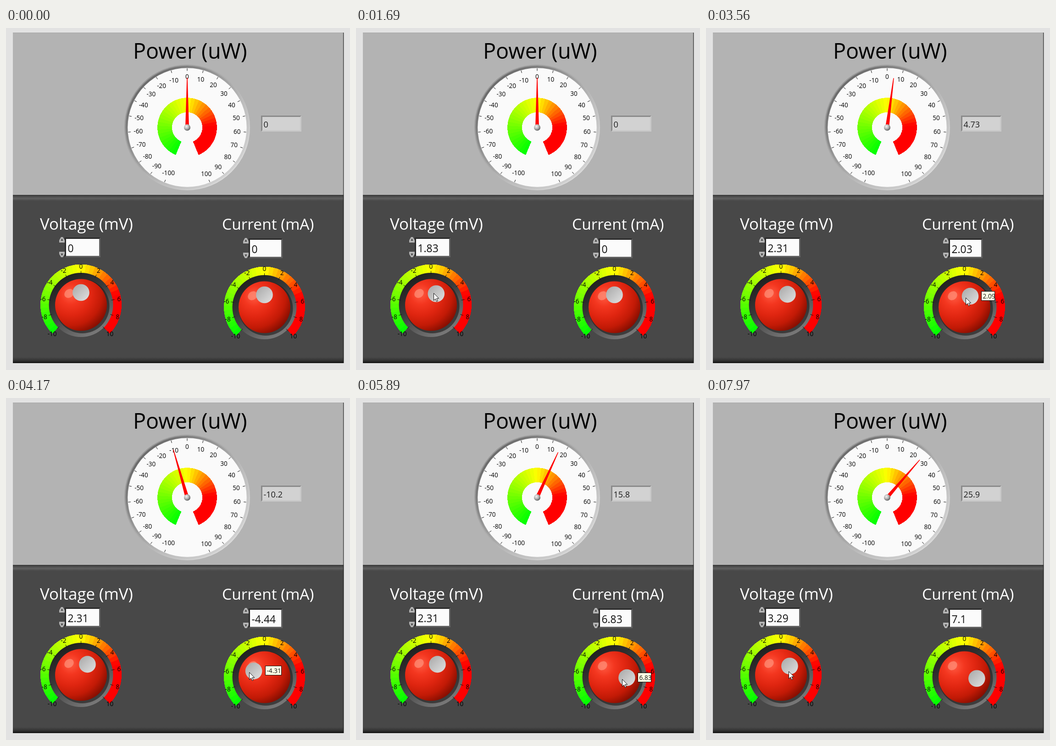
An HTML page that plays this animation: 750 px wide and 746 px high, repeating every 8000 ms.

```html
<!DOCTYPE html>
<html lang="en">
<head>
<meta charset="utf-8">
<title>Power meter</title>
<style>
  html, body { margin: 0; width: 100%; height: 100%; overflow: hidden; background: #e2e2e2; }
  svg { display: block; width: 750px; height: 746px; font-family: "Open Sans", "Noto Sans", sans-serif; }
  .scale { font-size: 13.6px; text-anchor: middle; }
  .tick { stroke: #111; stroke-width: 1; }
  .title { fill: #fff; }
  .value { font-size: 22.8px; fill: #111; }
</style>
</head>
<body>
<svg id="stage" viewBox="0 0 750 746"></svg>
<script>
const LOOP = 8000;
const REFRESH = 80;
const stage = document.getElementById('stage');
const gauge = { x: 395, y: 217, perUnit: 1.575 };
const knobs = {
  voltage: { x: 163.5, y: 604, perUnit: 13.5 },
  current: { x: 563.5, y: 609, perUnit: 13.5 }
};

const polar = (c, r, degrees) => {
  const a = degrees * Math.PI / 180;
  return [c.x + r * Math.sin(a), c.y - r * Math.cos(a)];
};
const at = p => p.map(n => n.toFixed(2)).join(' ');
const rect = (x, y, w, h, fill) => `<rect x="${x}" y="${y}" width="${w}" height="${h}" fill="${fill}"/>`;
const circle = (c, r, fill) => `<circle cx="${c.x}" cy="${c.y}" r="${r}" fill="${fill}"/>`;
const text = (x, y, str, attrs) => `<text x="${x}" y="${y}" ${attrs}>${str}</text>`;
const stops = list => list.map(([o, c]) => `<stop offset="${o}" stop-color="${c}"/>`).join('');
const linear = (id, direction, ...list) =>
  `<linearGradient id="${id}" x1="0" y1="0" ${direction}>${stops(list)}</linearGradient>`;
const radial = (id, shape, ...list) =>
  `<radialGradient id="${id}" ${shape}>${stops(list)}</radialGradient>`;

// Green to yellow below zero, then yellow to red well before full scale.
function band(c, inner, outer, limit) {
  const steps = 40;
  let out = '';
  for (let i = 0; i < steps; i++) {
    const v = (i + .5) / steps * 2 - 1;
    const red = Math.round(255 * Math.min(1, 1 + v));
    const green = Math.round(255 * (v < 0 ? 1 : Math.max(0, 1 - v / .54)));
    const a = limit * (i / steps * 2 - 1), b = limit * ((i + 1) / steps * 2 - 1);
    out += `<path shape-rendering="crispEdges" fill="rgb(${red},${green},0)" d="M${at(polar(c, inner, a))}` +
      `L${at(polar(c, outer, a))}A${outer} ${outer} 0 0 1 ${at(polar(c, outer, b))}` +
      `L${at(polar(c, inner, b))}A${inner} ${inner} 0 0 0 ${at(polar(c, inner, a))}"/>`;
  }
  return out;
}

function scale(c, max, step, tickFrom, tickTo, radius) {
  let out = '';
  for (let v = -max; v <= max; v += step) {
    const angle = v * c.perUnit;
    const [x, y] = polar(c, radius(v), angle);
    out += `<path class="tick" d="M${at(polar(c, tickFrom, angle))}L${at(polar(c, tickTo, angle))}"/>` +
      text(x.toFixed(1), (y + 5).toFixed(1), v, 'class="scale"');
  }
  return out;
}

function field(x, y, w, h, id) {
  return rect(x, y, w, h, '#2b2b2b') +
    `<path d="M${x} ${y + h}h${w}v${-h}l-3 3v${h - 6}h${6 - w}z" fill="#626262"/>` +
    rect(x + 3, y + 3, w - 6, h - 6, '#fbfbfb') +
    text(x + 6.5, y + 32, '0', `id="${id}" class="value"`);
}

function spinner(x, y) {
  const arrow = (dy, flip) => `<g transform="translate(${x} ${y + dy}) scale(1 ${flip})">
    <path d="M-6 6V1L-2 -6H2L6 1V6z" fill="#b4b4b4"/><path d="M-2.5 2L0 -3L2.5 2z" fill="#444"/></g>`;
  return arrow(0, 1) + arrow(32, -1);
}

function knob(name) {
  const c = knobs[name];
  return band(c, 69, 88.5, 135) + circle(c, 70, 'url(#groove)') +
    `<g opacity=".6">${circle({ x: c.x + 3, y: c.y + 3 }, 59, '#1c1c1c')}</g>` +
    circle(c, 56.5, 'url(#red)') +
    `<ellipse rx="11" ry="9" transform="translate(${c.x - 26} ${c.y - 25}) rotate(-40)" fill="#ff9680" opacity=".65"/>` +
    scale(c, 10, 2, 67, 74, v => Math.abs(v) === 10 ? 89 : 84) +
    `<circle id="${name}Dot" r="18.3" fill="url(#silver)"/>`;
}

stage.innerHTML = `<defs>
  ${linear('top', 'x2="0" y2="1"', [0, '#353535'], [.25, '#4a4a4a'], [.6, '#606060'], [1, '#484848'])}
  ${linear('bottom', 'x2="0" y2="1"', [0, '#484848'], [.5, '#353535'], [1, '#111'])}
  ${linear('bezel', 'x2="1" y2="1"', [.1, '#626262'], [.45, '#a0a0a0'], [.62, '#bcbcbc'], [.9, '#d4d4d4'])}
  ${linear('rim', 'x2="1" y2="1"', [.1, '#929292'], [.5, '#b1b1b1'], [.9, '#e0e0e0'])}
  ${linear('groove', 'x2=".6" y2="1"', [.1, '#1c1c1c'], [.5, '#393939'], [.75, '#5a5a5a'], [1, '#777'])}
  ${linear('silver', 'x2="1" y2="1"', [.1, '#adadad'], [.9, '#dcdcdc'])}
  ${radial('red', 'cx=".3" cy=".29" r=".8"', [0, '#ff5a42'], [.25, '#f3361f'], [.52, '#df2510'], [.76, '#c21a06'], [1, '#800d00'])}
  ${radial('hub', 'cx=".38" cy=".35" r=".7"', [0, '#f4f4f4'], [.5, '#b5b5b5'], [1, '#555'])}
  </defs>` +
  rect(15, 10, 721, 354, '#b3b3b3') + rect(15, 10, 721, 1, '#a4a4a4') +
  rect(735, 10, 1.5, 354, '#404040') +
  rect(15, 364, 721, 366, '#484848') + rect(15, 364, 721, 13, 'url(#top)') +
  rect(15, 718, 721, 13, 'url(#bottom)') + rect(735, 364, 1.5, 367, '#202020') +
  text(277, 67, 'Power (uW)', 'font-size="46.7" fill="#000"') +
  text(74, 440, 'Voltage (mV)', 'class="title" font-size="34.8"') +
  text(471, 440, 'Current (mA)', 'class="title" font-size="33.5"') +
  circle(gauge, 137, 'url(#rim)') + circle(gauge, 134.5, 'url(#bezel)') + circle(gauge, 129.7, '#fafafa') +
  band(gauge, 33, 64.8, 157.5) +
  scale(gauge, 100, 10, 123.5, 129, v => v > 0 ? 109 : v < 0 ? 107 : 111.5) +
  rect(556, 191, 88, 35, '#8b8b8b') + `<path d="M556 226h88v-35l-3 3v29h-82z" fill="#c8c8c8"/>` +
  rect(559, 194, 82, 29, '#d2d2d2') +
  text(561.5, 217, '0', 'id="power" font-size="18" fill="#1c1c1c"') +
  spinner(122, 462) + spinner(523, 464) +
  field(128, 457, 78, 43, 'voltage') + field(529, 459, 74, 43, 'current') +
  knob('voltage') + knob('current') +
  `<path id="needle" d="M391 217L394.3 108.5H395.7L399 217z" fill="#f00"/>
  ${circle(gauge, 7, 'url(#hub)')}
  <g id="tip"><rect x=".5" y="-10.5" height="20" fill="#ffffe5" stroke="#111"/>
    <text x="3.5" y="5" font-size="13.6" fill="#111"></text></g>
  <path id="cursor" d="M.5 .5V16.2L4.2 12.8L6.7 18.5L9.2 17.4L6.7 11.9H11.7z" fill="#fff" stroke="#111"/>`;

// Turning points of each knob: time, value.
const turns = {
  voltage: [[960, 0], [1680, 1.83], [1840, 2.31], [7045, 2.31], [7280, 5.44], [7600, 8.1], [7840, 8.1], [8000, -1.52]],
  current: [[3080, 0], [3480, 2.1], [4160, -4.436], [4720, -8.8], [4960, -8.8], [5700, 1.5], [5780, 6.83], [6080, 6.83], [6160, 7.1]]
};
// The pointer holds a knob at an offset from its dot; the hint shows for part of that time.
const entry = { time: 120, x: 438, y: 677 };
const drags = [
  { knob: 'voltage', from: 890, to: 2000, grip: [-6, -1], hint: [1200, 1640] },
  { knob: 'current', from: 2720, to: 6120, grip: [-10, 3], hint: [3200, 6100] },
  { knob: 'voltage', from: 6800, to: LOOP, grip: [-2, 11], hint: [7040, 7900] }
];

const ui = Object.fromEntries(
  ['power', 'voltage', 'current', 'voltageDot', 'currentDot', 'needle', 'tip', 'cursor']
    .map(id => [id, document.getElementById(id)]));
const [tipBox, tipText] = ui.tip.children;

const smooth = f => f * f * (3 - 2 * f);
const mix = (a, b, f) => a + (b - a) * f;
const format = v => String(Number(v.toPrecision(3)));
const place = (node, p) => node.setAttribute('transform', `translate(${at(p)})`);
const show = (node, on) => node.setAttribute('visibility', on ? 'visible' : 'hidden');

function valueAt(name, t) {
  const keys = turns[name];
  const next = keys.findIndex(([time]) => time > t);
  if (next <= 0) return keys.at(next)[1];
  const [t0, v0] = keys[next - 1], [t1, v1] = keys[next];
  return mix(v0, v1, smooth((t - t0) / (t1 - t0)));
}

const dotAt = (name, t) => polar(knobs[name], 27, valueAt(name, t) * knobs[name].perUnit);
const held = (drag, t) => dotAt(drag.knob, t).map((n, k) => n + drag.grip[k]);

function cursorAt(t) {
  const index = drags.findIndex(drag => t < drag.to);
  const drag = drags[index], last = drags[index - 1];
  if (t >= drag.from) return held(drag, t);
  const left = last ? last.to : entry.time;
  const start = last ? held(last, left) : [entry.x, entry.y];
  const goal = held(drag, drag.from);
  const f = smooth(Math.max(0, (t - left) / (drag.from - left)));
  return start.map((n, k) => mix(n, goal[k], f));
}

function draw(time) {
  const t = Math.floor(time / REFRESH) * REFRESH;
  const power = valueAt('voltage', t - 4) * valueAt('current', t - 4);
  for (const name in knobs) {
    ui[name].textContent = format(valueAt(name, t));
    place(ui[name + 'Dot'], dotAt(name, t));
  }
  ui.power.textContent = format(power);
  ui.needle.setAttribute('transform', `rotate(${power * gauge.perUnit} ${gauge.x} ${gauge.y})`);

  // The hint trails slightly behind the knob.
  const drag = drags.find(({ hint: [from, to] }) => t >= from && t < to);
  show(ui.tip, drag);
  if (drag) {
    const hint = valueAt(drag.knob, t - 55);
    const [x, y] = dotAt(drag.knob, t - 55);
    place(ui.tip, [Math.round(x + 24), Math.round(y)]);
    tipBox.setAttribute('width', hint < 0 ? 35 : 29);
    tipText.textContent = format(hint);
  }

  place(ui.cursor, cursorAt(t).map(Math.round));
  show(ui.cursor, time >= entry.time);
}

const start = performance.now();
function tick() {
  draw((performance.now() - start) % LOOP);
  requestAnimationFrame(tick);
}
tick();
</script>
</body>
</html>
```
